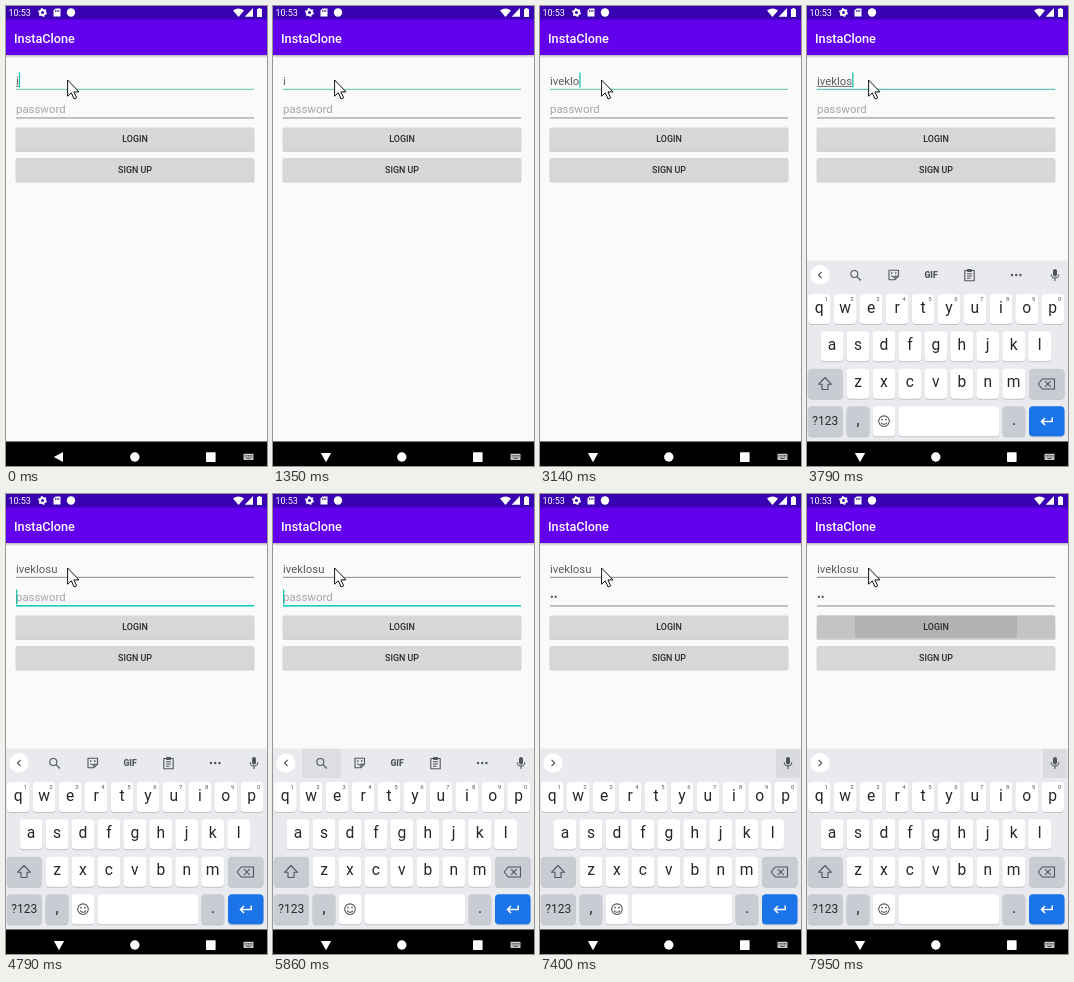
An HTML page that plays this animation: 261 px wide and 460 px high, repeating every 8 s.

```html
<!DOCTYPE html>
<html lang="en">
<head>
<meta charset="utf-8">
<title>Login screen</title>
<style>
html, body { margin: 0; width: 100%; height: 100%; overflow: hidden; background: #fafafa; }
svg { display: block; width: 261px; height: 460px; font-family: Roboto, "Open Sans", sans-serif; }
.field { font-size: 11.4px; fill: #5c5c5c; }
.button { font-size: 8.9px; font-weight: 500; fill: #2a2a2a; text-anchor: middle; }
.key { font-size: 15.6px; fill: #24272b; text-anchor: middle; }
.digit { font-size: 6px; fill: #555a60; text-anchor: middle; }
.line { fill: none; stroke: #50555b; stroke-width: 1.1; stroke-linejoin: round; }
.solid { fill: #50555b; }
</style>
</head>
<body>
<svg viewBox="0 0 261 460">
  <defs>
    <linearGradient id="shade" x2="0" y2="1">
      <stop stop-color="#000" stop-opacity=".26"/>
      <stop offset="1" stop-color="#000" stop-opacity="0"/>
    </linearGradient>
  </defs>
  <rect width="261" height="460" fill="#fafafa"/>
  <rect y="49" width="261" height="3" fill="url(#shade)"/>
  <rect y="13" width="261" height="36" fill="#6200ee"/>
  <rect width="261" height="13.5" fill="#3900b1"/>
  <text x="8" y="37" font-size="12.7" font-weight="500" fill="#fff">InstaClone</text>

  <g fill="#fff">
    <text x="2.5" y="9.8" font-size="9">10:53</text>
    <circle cx="36.5" cy="6.5" r="2.5" fill="none" stroke="#fff" stroke-width="2"/>
    <circle cx="36.5" cy="6.5" r="3.9" fill="none" stroke="#fff" stroke-width="1.2" stroke-dasharray="1.7 2.384"/>
    <path d="M49.5 2.5H54.5V10.5H47.5V4.5Z"/>
    <path d="M49.6 4v2M51.2 4v2M52.8 4v2" stroke="#3900b1" stroke-width=".8"/>
    <circle cx="65" cy="6.5" r="4.2"/>
    <path d="M227 4.6Q232.5 .4 238 4.6L232.5 11Z"/>
    <path d="M247 2V10.7H238.7Z"/>
    <path d="M251 3H252.5V2H254.5V3H256V11H251Z"/>
  </g>

  <rect id="userLine" x="10" width="238"/>
  <rect id="passLine" x="10" width="238"/>
  <text id="user" class="field" x="10" y="78.6"></text>
  <text id="pass" class="field" x="10" y="107.4"></text>
  <rect id="compose" x="10" y="79.9" height=".9" fill="#5c5c5c"/>
  <rect id="caret" width="1.3" height="15" fill="#1fc3a5"/>

  <g id="buttons"></g>
  <g id="press">
    <rect x="10" y="121.5" width="238" height="23" rx="1" fill="#c4c4c4"/>
    <rect x="48" y="122" width="162" height="22" fill="#b3b3b3"/>
  </g>
  <text class="button" x="129" y="136.2">LOGIN</text>
  <text class="button" x="129" y="167">SIGN UP</text>

  <g id="keyboard">
    <rect y="254.5" width="261" height="182" fill="#e8eaed"/>
    <rect id="searchGlow" x="29" y="255" width="39" height="29" fill="#dcdee1"/>
    <rect id="micGlow" x="236" y="255" width="24" height="29" fill="#d9dbde"/>
    <circle cx="13" cy="269" r="9.7" fill="#fff"/>
    <path id="chevron" class="line" d="M14.7 265.8L11.5 269L14.7 272.2"/>
    <g id="tools">
      <circle class="line" cx="47.3" cy="268" r="3.5"/>
      <path class="line" d="M50 270.7L53.8 274.5" stroke-width="1.5"/>
      <path class="line" d="M82 264.3H91.5V270.2L88 273.7H82ZM91.5 270.2H88V273.7M84.2 269.5Q86.5 272.3 88.8 269.5"/>
      <path class="solid" d="M84 266.3h1.5v1.5H84zM88 266.3h1.5v1.5H88z"/>
      <text class="solid" x="124" y="272.2" font-size="8.6" font-weight="900" text-anchor="middle">GIF</text>
      <path class="line" d="M157.8 264.5H167.2V274.7H157.8ZM160 267.7H165M160 270H165M160 272.2H163.5"/>
      <rect class="solid" x="160.2" y="263" width="4.6" height="3"/>
      <circle class="solid" cx="205" cy="269" r="1.2"/>
      <circle class="solid" cx="209.2" cy="269" r="1.2"/>
      <circle class="solid" cx="213.4" cy="269" r="1.2"/>
    </g>
    <rect class="solid" x="246" y="263" width="4" height="7.6" rx="2"/>
    <path class="line" d="M244.2 268.2a3.8 3.8 0 0 0 7.6 0M248 272V275"/>
    <g id="keys"></g>
    <path class="line" d="M18 371.5L24.5 378.3H21V383.5H15V378.3H11.5Z"/>
    <path class="line" d="M235.2 373H247.5V383H235.2L231.2 378ZM238 375.2L243.7 380.8M243.7 375.2L238 380.8"/>
    <circle class="line" cx="77" cy="415.2" r="5.3"/>
    <path class="line" d="M74 416.6Q77 420 80 416.6"/>
    <circle class="solid" cx="75" cy="413.6" r=".9"/>
    <circle class="solid" cx="79" cy="413.6" r=".9"/>
    <path d="M245.2 411.6V415.5H234.6M238 412L234.5 415.5L238 419" fill="none" stroke="#fff" stroke-width="1.5"/>
  </g>

  <rect y="435.5" width="261" height="24.5" fill="#000"/>
  <path id="back" d="M47.8 451L57 445.9V456.1Z" fill="#fff"/>
  <circle cx="128.8" cy="451" r="4.7" fill="#fff"/>
  <rect x="200" y="446.3" width="9.6" height="9.6" rx=".7" fill="#fff"/>
  <rect x="237.5" y="447.8" width="10" height="6.2" rx=".8" fill="#ccc"/>
  <path d="M238.7 449.5h7.8M238.7 451h7.8" stroke="#222" stroke-width=".8" stroke-dasharray="1 .7"/>
  <path d="M240.3 452.6h4.4" stroke="#222" stroke-width=".7"/>

  <path d="M61.6 74V90.2L65.3 86.8L68.1 93L70.7 91.8L67.9 85.9H73Z" fill="#fff" stroke="#111" stroke-width="1" stroke-linejoin="round"/>
</svg>
<script>
const LOOP = 8000;
const NAME = "iveklosu";
const TEAL = "#10cfbb", MINT = "#69cdac", GREY = "#949494";
const $ = id => document.getElementById(id);

function add(parent, tag, attrs, text = "") {
  const el = document.createElementNS("http://www.w3.org/2000/svg", tag);
  for (const k in attrs) el.setAttribute(k, attrs[k]);
  el.textContent = text;
  parent.append(el);
}

function set(id, attrs) {
  for (const k in attrs) $(id).setAttribute(k, attrs[k]);
}

function keyBox(x, y, width, fill = "#fff") {
  add($("keys"), "rect", { x, y: y + 1, width, height: 30, rx: 4, fill: "#bfc2c7" });
  add($("keys"), "rect", { x, y, width, height: 30, rx: 4, fill });
}

function label(x, y, text, cls = "key", size = "") {
  add($("keys"), "text", { x, y, class: cls, style: size && `font-size:${size}px` }, text);
}

function buildKeys() {
  const rows = [["qwertyuiop", 0.8, 288], ["asdfghjkl", 13.6, 325.3], ["zxcvbnm", 39.6, 362.8]];
  for (const [letters, left, y] of rows)
    [...letters].forEach((c, i) => {
      const x = left + i * 25.95;
      keyBox(x, y, 22.8);
      label(x + 11.4, y + 18.6, c);
      if (letters.length === 10) label(x + 18.3, y + 7, (i + 1) % 10, "digit");
    });
  const dark = "#c9ccd2";
  keyBox(0.8, 362.8, 35, dark);
  keyBox(222, 362.8, 35.5, dark);
  keyBox(0.8, 400.3, 35, dark);
  keyBox(39.6, 400.3, 22.8, dark);
  keyBox(65.6, 400.3, 22.8);
  keyBox(91.5, 400.3, 100.7);
  keyBox(195.5, 400.3, 22.8, dark);
  keyBox(222, 400.3, 35.5, "#1a73e8");
  label(18.2, 419.4, "?123", "key", 12);
  label(51, 419.4, ",");
  label(207, 419.4, ".");
}

for (const y of [121.5, 152]) {
  add($("buttons"), "rect", { x: 9.5, y: y + 1, width: 239, height: 23.4, rx: 1.5, fill: "#000", opacity: 0.16 });
  add($("buttons"), "rect", { x: 10, y, width: 238, height: 23, rx: 1, fill: "#d6d7d7" });
}
buildKeys();

// Each step changes only the listed values; the rest carry over.
const steps = [
  [0, { typed: 1, pass: "", focus: "user", caret: 1, compose: 1, line: MINT, keys: 0, tools: 1, open: 1, search: 0, mic: 0, press: 0 }],
  [80, { compose: 0 }],
  [350, { caret: 0 }],
  [870, { caret: 1 }],
  [1350, { caret: 0 }],
  [1630, { typed: 3, caret: 1 }],
  [1910, { typed: 4 }],
  [2400, { caret: 0 }],
  [2990, { typed: 5, caret: 1 }],
  [3140, { typed: 6 }],
  [3790, { typed: 7, compose: 1, keys: 1, line: "#4cc0ad" }],
  [3880, { typed: 8, line: TEAL }],
  [4790, { focus: "pass", compose: 0 }],
  [5490, { caret: 0, search: 1 }],
  [5860, { caret: 1 }],
  [6570, { pass: "•w" }],
  [6760, { search: 0, open: 0, tools: 0.45 }],
  [6910, { caret: 0, tools: 0.15 }],
  [6970, { tools: 0, mic: 1 }],
  [7400, { pass: "••", focus: "" }],
  [7950, { press: 1 }]
];

function stateAt(t) {
  return Object.assign({}, ...steps.filter(s => s[0] <= t).map(s => s[1]));
}

function underline(id, y, focused, color) {
  const strong = focused && color === TEAL;
  set(id, { y: strong ? y - 0.4 : y, height: strong ? 1.6 : 1.1, fill: focused ? color : GREY });
}

function draw(t) {
  const s = stateAt(t);
  const userText = NAME.slice(0, s.typed);
  $("user").textContent = userText;
  $("pass").textContent = s.pass || "password";
  $("pass").style.fill = s.pass ? "" : "#a5a5a5";
  underline("userLine", 82.8, s.focus === "user", s.line);
  underline("passLine", 111.4, s.focus === "pass", s.line);

  const userWidth = $("user").getComputedTextLength();
  const passWidth = s.pass ? $("pass").getComputedTextLength() : 0;
  const onUser = s.focus === "user";
  set("compose", { width: userWidth, opacity: s.compose });
  set("caret", {
    x: 10 + (onUser ? userWidth : passWidth),
    y: onUser ? 66.5 : 95.5,
    opacity: s.focus ? s.caret : 0
  });

  set("keyboard", { opacity: s.keys });
  set("tools", { opacity: s.tools });
  set("searchGlow", { opacity: s.search });
  set("micGlow", { opacity: s.mic });
  set("press", { opacity: s.press });
  set("chevron", { transform: s.open ? "" : "rotate(180 13.1 269)" });

  const turn = t < 80 ? 0 : Math.min(5, 1 + Math.floor((t - 80) / 67.5));
  set("back", { transform: `rotate(${-18 * turn} 53 451)` });
}

const start = performance.now();
function tick() {
  draw((performance.now() - start) % LOOP);
  requestAnimationFrame(tick);
}
tick();
</script>
</body>
</html>
```
